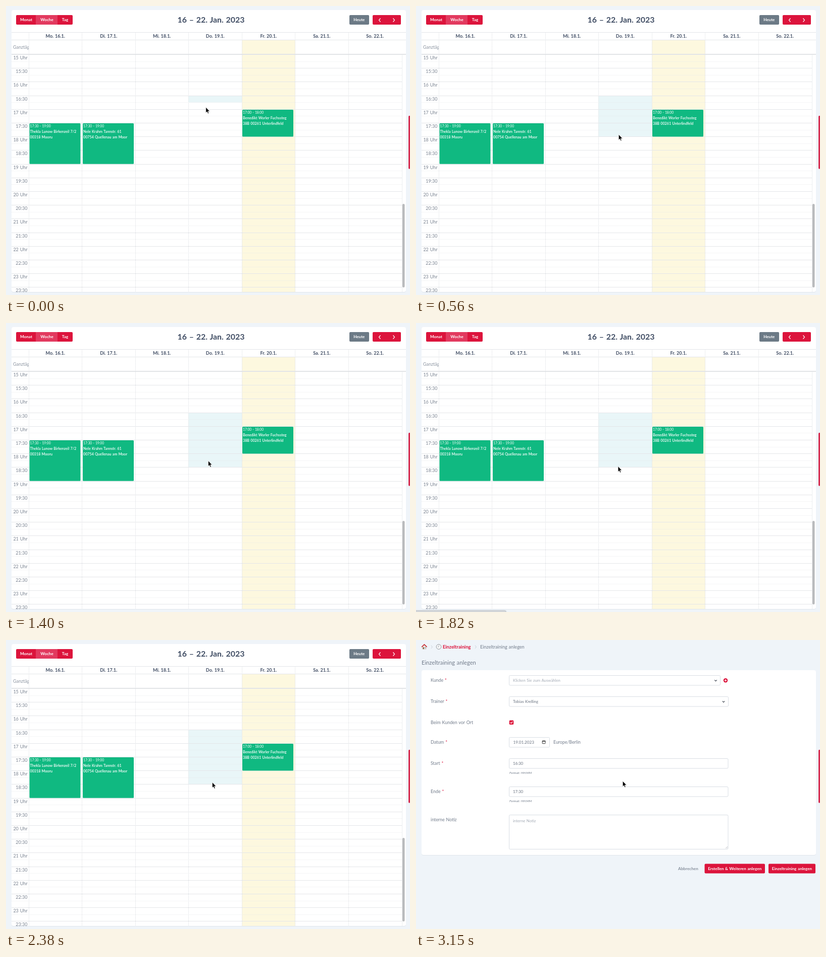
Recreate the animation shown at these times as an HTML page. Size 800 by 574 pixels, loop 3220 ms.

```html
<!DOCTYPE html>
<html lang="de">
<head>
<meta charset="utf-8">
<title>Kalender</title>
<style>
  html, body { margin: 0; width: 100%; height: 100%; overflow: hidden; background: #eff4f9; }
  svg { display: block; }
  text { font-family: Lato, "Open Sans", sans-serif; word-spacing: .06em; white-space: pre; }
</style>
</head>
<body>
<svg id="stage" width="800" height="574" viewBox="0 0 800 574"></svg>
<script>
const RED = '#dc143c', GREY = '#727c8b', DARK = '#3f4c63', LINE = '#e4e6e9';
const LOOP = 3220, STEP = 70, PAGE_AT = 2520, FORM_AT = 2940;
const GRID_TOP = 96.4, ROW = 27.2, COL = 105.5, SELECT_TOP = 178;

const text = (x, y, s, size, fill = GREY, extra = '') =>
  `<text x="${x}" y="${y}" font-size="${size}" fill="${fill}" ${extra}>${s}</text>`;
const bold = (x, y, s, size, fill) => text(x, y, s, size, fill, 'font-weight="700"');
const centred = (x, y, s, size, fill) =>
  text(x, y, s, size, fill, 'font-weight="700" text-anchor="middle"');
const rect = (x, y, w, h, fill, r = 0, extra = '') =>
  `<rect x="${x}" y="${y}" width="${w}" height="${h}" rx="${r}" fill="${fill}" ${extra}/>`;
const path = (d, stroke, width = 1, extra = '') =>
  `<path d="${d}" fill="none" stroke="${stroke}" stroke-width="${width}" ${extra}/>`;
const circle = (x, y, r, fill, extra = '') =>
  `<circle cx="${x}" cy="${y}" r="${r}" fill="${fill}" ${extra}/>`;
const hLine = (y, x1, x2, extra) => path(`M${x1} ${y}H${x2}`, LINE, 1, extra);
const group = (id, body, extra = '') => `<g id="${id}" ${extra}>${body}</g>`;
const card = (y, h) =>
  rect(11, y + 1, 781, h, '#dfe5ec', 4) + rect(11, y, 781, h, '#fff', 4);
const snap = y => Math.floor(y) + .5;

function event(x, y, h, lines) {
  return rect(x, y, 101, h, '#10b981', 1.5) +
    text(x + 1, y + 7.6, lines[0], 6.7, '#fff') +
    text(x + 1, y + 18.6, lines[1], 7.2, '#fff', 'font-weight="600"') +
    text(x + 1, y + 29.9, lines[2], 7.2, '#fff', 'font-weight="600"');
}

function toolbar() {
  return rect(20, 18, 112, 19, RED, 2) + rect(59, 18, 43, 19, '#e23a5f') +
    centred(40, 30.3, 'Monat', 8.1, '#fff') +
    centred(81, 30.3, 'Woche', 8.1, '#fff') +
    centred(117, 30.3, 'Tag', 8.1, '#fff') +
    centred(406, 33, '16 – 22. Jan. 2023', 15.9, DARK) +
    rect(680, 18, 39, 19, '#6c7a86', 2) + centred(699.3, 30.3, 'Heute', 8.1, '#fff') +
    rect(726, 18, 56, 19, RED, 2) +
    path('M741.5 24.5L738.5 28L741.5 31.5M766.5 24.5L769.5 28L766.5 31.5', '#fff', 1.2);
}

function calendar() {
  let s = card(8, 560) + toolbar() + rect(467, 68, 106, 500, '#fdf8df');
  s += '<rect id="selection" x="361" width="106" fill="#e9f6f8"/>';
  s += hLine(52.5, 11, 792) + hLine(67.5, 11, 792);
  let axis = text(14, 85, 'Ganztägig', 9, '#8b94a1');
  for (let i = 0; i < 18; i++) {
    const y = GRID_TOP + i * ROW, hour = 15 + (i >> 1);
    if (i) s += hLine(snap(y), 11, 784);
    if (i < 17) s += hLine(snap(y + ROW / 2), 11, 784, 'stroke-dasharray="1 1" opacity=".75"');
    axis += text(42.5, y + 9.6, i % 2 ? hour + ':30' : hour + ' Uhr', 9, '#7b8492', 'text-anchor="end"');
  }
  s += rect(11, 95, 781, 2, '#e2e4e7');
  const days = ['Mo', 'Di', 'Mi', 'Do', 'Fr', 'Sa', 'So'];
  days.forEach((day, i) => {
    const x = 45 + i * COL;
    s += path(`M${snap(x)} 52V568`, LINE, 1, 'stroke-dasharray="2 1"');
    s += centred(x + COL / 2, 63, `${day}. ${16 + i}.1.`, 9, DARK);
  });
  s += path('M784.5 97V568', '#eceef0');
  s += `<g clip-path="url(#axisClip)">${axis}</g>`;
  s += event(46.5, 233, 80.7, ['17:30 - 19:00', 'Thekla Lunow Birkenzeil 7/2', '00318 Mooru']);
  s += event(152, 233, 80.7, ['17:30 - 19:00', 'Nele Krahm Tannstr. 61', '00754 Quellenau am Moor']);
  s += event(468, 206, 53.5, ['17:00 - 18:00', 'Benedikt Worler Fuchssteg', '38B 00261 Unterlindfeld']);
  return s + rect(785, 393, 4.5, 166, '#b9bbbd', 2.2);
}

function breadcrumb() {
  const chevron = x => path(`M${x} 10.8L${x + 2.4} 13.8L${x} 16.8`, '#c3cbd5', .9);
  return '<path d="M12.8 13V18H20V13L16.4 9.5Z" fill="#f3e9dc" stroke="#a39a90" stroke-width=".5"/>' +
    path('M11.3 13.8L16.4 9L21.6 13.8', '#c9303a', 1.7) +
    rect(13.8, 14.3, 2, 3.7, '#7c5138') + rect(17.2, 14.3, 1.9, 1.9, '#6d9fc4') +
    chevron(30) + circle(45, 13.5, 4.8, '#f7f8f9', 'stroke="#8f959c" stroke-width="1"') +
    path('M45 10.7V13.7H42.8', '#8f959c', .7) +
    bold(53, 17, 'Einzeltraining', 9.2, RED) + chevron(117) +
    text(127, 17, 'Einzeltraining anlegen', 9.1);
}

function form() {
  const box = (y, w, h = 19.5) =>
    rect(184.5, y + .5, w, h, '#fff', 2, 'stroke="#d9dee4" stroke-width="1"');
  const label = (y, s, required) => text(29, y, s +
    (required ? ` <tspan fill="${RED}">*</tspan>` : ''), 8.9);
  const value = (y, s, fill = '#68717f') => text(192, y, s, 7.8, fill);
  const hint = y => text(185, y, 'Format: HH:MM', 6.4, GREY, 'font-style="italic"');
  const arrow = (x, y) => path(`M${x - 2.3} ${y - 1.1}L${x} ${y + 1.2}L${x + 2.3} ${y - 1.1}`, '#3f4652', 1.2);
  const button = (x, w, s) => rect(x, 444.5, w, 19, RED, 2) + centred(x + w / 2, 456.7, s, 8.1, '#fff');
  return text(11, 48.7, 'Einzeltraining anlegen', 11.2) + card(60, 367) +
    label(83, 'Kunde', true) + box(70, 418) + value(82.7, 'Klicken Sie zum Auswählen', '#a4abb6') +
    arrow(593.5, 80.5) + circle(613, 80.3, 4.2, RED) + path('M610.7 80.3H615.3M613 78V82.6', '#fff', 1.2) +
    label(125, 'Trainer', true) + box(112, 434) + value(124.7, 'Tobias Krelling') + arrow(609, 122.5) +
    label(167, 'Beim Kunden vor Ort') + rect(184.7, 159.4, 8.6, 8.6, RED, 1.7) +
    path('M186.7 163.8L188.4 165.4L191.4 162.1', '#fff', 1.2) +
    label(206, 'Datum', true) + box(193, 80) + text(192.5, 205.5, '19.01.2023', 8.1, '#68717f') +
    rect(250.2, 200.3, 5.8, 5.4, 'none', .6, 'stroke="#222" stroke-width=".9"') +
    path('M250 200.8H256.2', '#222', 1.5) + text(272, 206, 'Europe/Berlin', 8.8) +
    label(248, 'Start', true) + box(235, 433.5) + value(247.7, '16:30') + hint(266) +
    label(304, 'Ende', true) + box(291, 433.5) + value(303.7, '17:30') + hint(322) +
    label(360, 'interne Notiz') + box(347, 433.5, 68) + value(361.7, 'interne Notiz', '#a4abb6') +
    path('M613 414L617 410M615.3 414L617 412.3', '#9aa0a8', .6) +
    bold(519, 456.7, 'Abbrechen', 8.2, '#87909d') +
    button(571.5, 119.5, 'Erstellen &amp; Weiteren anlegen') +
    button(698, 93, 'Einzeltraining anlegen');
}

const stage = document.getElementById('stage');
stage.innerHTML =
  '<clipPath id="axisClip"><rect x="11" y="68" width="34" height="500"/></clipPath>' +
  group('calendar', calendar()) +
  group('crumbs', breadcrumb()) +
  group('loader', [391, 401.3, 411.5].map(x => circle(x, 78.5, 3.3, '#cfd6de')).join('')) +
  group('form', form()) +
  rect(797, 218, 5, 105.5, '#d62f52', 1.5) +
  group('status', rect(-4, 570, 184, 8, '#e2e7ec', 4) + rect(-4, 571, 182, 8, '#d3d6d9', 3,
    'stroke="#b9bdc2" stroke-width=".8"')) +
  group('cursor', '<path d="M0 0V11.2L2.5 8.9L4.1 12.8L6 12L4.4 8.2H7.8Z" fill="#000" stroke="#fff" stroke-width=".8"/>');

const part = id => document.getElementById(id);
const [cal, crumbs, loader, formPage, status, cursor, selection] =
  ['calendar', 'crumbs', 'loader', 'form', 'status', 'cursor', 'selection'].map(part);
const show = (el, on) => el.setAttribute('display', on ? 'inline' : 'none');

// time, x, y of the pointer tip
const track = [
  [0, 395.7, 201], [560, 401.2, 255], [1050, 400.7, 264.5], [1820, 400, 284.5],
  [2030, 401, 284.5], [2310, 408.3, 282.5], [2800, 408.5, 282.5], [3150, 409.2, 280]
];

function pointer(t) {
  const i = Math.max(1, track.findIndex(k => k[0] >= t));
  const [a, b] = [track[i - 1], track[i]];
  const u = (t - a[0]) / (b[0] - a[0]);
  return [a[1] + (b[1] - a[1]) * u, a[2] + (b[2] - a[2]) * u];
}

function draw(now) {
  const t = Math.floor(now % LOOP / STEP) * STEP;
  const [x, y] = pointer(t);
  cursor.setAttribute('transform', `translate(${x} ${y})`);

  // the selection grows in quarter-hour steps under the pointer
  const slots = t < STEP ? 1 : Math.ceil((y - SELECT_TOP) / (ROW / 2));
  selection.setAttribute('y', SELECT_TOP);
  selection.setAttribute('height', slots * ROW / 2);

  show(cal, t < PAGE_AT);
  show(crumbs, t >= PAGE_AT);
  show(loader, t >= PAGE_AT && t < FORM_AT);
  show(formPage, t >= FORM_AT);
  show(status, t >= 1750 && t < 2240 || t >= PAGE_AT && t < 2800);

  const swing = Math.abs((t - 2660) / 400);
  [...loader.children].forEach((dot, i) => {
    const big = i === 1 ? swing : 1 - swing;
    dot.setAttribute('r', 2.1 + 1.3 * big);
    dot.setAttribute('fill-opacity', .6 + .4 * big);
  });
  requestAnimationFrame(frame);
}

const start = performance.now();
function frame() { draw(performance.now() - start); }
frame();
</script>
</body>
</html>
```
